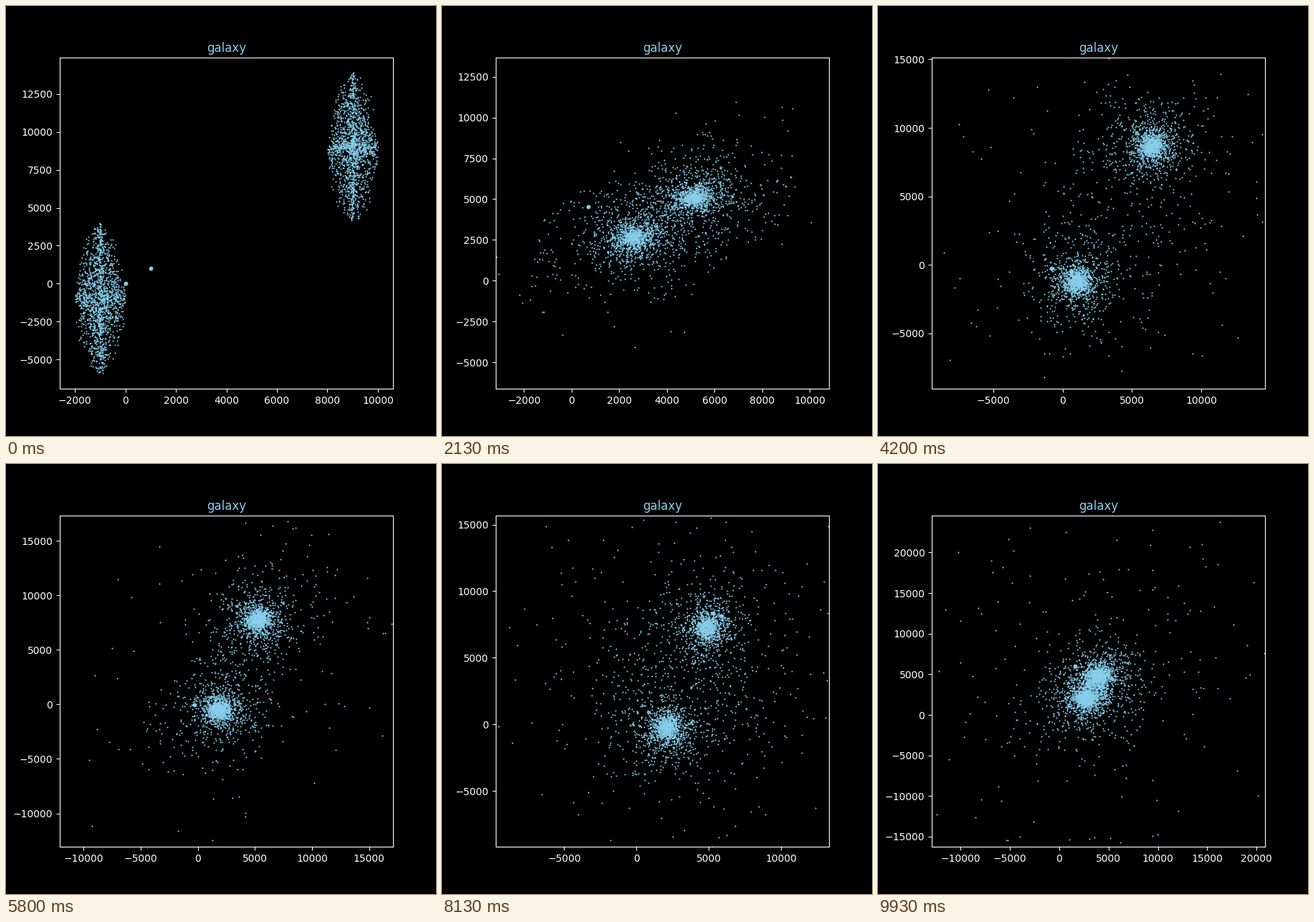
A matplotlib script that plays this animation: 600 px wide and 600 px high, repeating every 9.99 s.

```python
import numpy as np
import matplotlib.pyplot as plt
from matplotlib.animation import FuncAnimation

FRAMES = 150
STARS = 1500            # per galaxy
PULL = 1.4e9            # gravity of one core
SOFT = 800              # softening radius of a core
STEPS = 6               # integration steps per frame
KICK = 150              # random starting speed
SKY = "skyblue"
rng = np.random.default_rng(11)

# Key points: time, first core from the midpoint (x, y),
# view (left, right, bottom, top)
KEYS = np.array([
    [0, -5000, -5000, -2596, 10596, -6939, 14912],
    [18, -4000, -4150, -3640, 11925, -8075, 17068],
    [45, 1600, 2300, -2700, 9585, -5060, 10015],
    [63, 2700, 4950, -9447, 14600, -9027, 15130],
    [87, 1700, 4150, -12104, 17104, -13055, 17300],
    [122, -1400, -3750, -9727, 13292, -9196, 15673],
    [149, -650, -1500, -12945, 20872, -16236, 24546]], float)
times, swing, view = KEYS[:, 0], KEYS[:, 1:3], KEYS[:, 3:]
speed = np.gradient(swing, times, axis=0)
speed[0] = 0            # both fall from rest


def cores(t):
    """Both cores, swinging symmetrically about a slowly drifting midpoint."""
    i = min(np.searchsorted(times, t, side="right") - 1, len(times) - 2)
    span = times[i + 1] - times[i]
    s = (t - times[i]) / span
    ease = s * s * (3 - 2 * s)
    offset = swing[i] + (swing[i + 1] - swing[i]) * ease
    offset = offset + span * s * (1 - s) * (speed[i] * (1 - s) - speed[i + 1] * s)
    mid = 4000 - np.array([650, 600]) * t / FRAMES
    return mid + offset, mid - offset


def galaxy(center):
    """Tall ellipse of stars, denser along its axes."""
    turn = rng.uniform(0, 2 * np.pi, STARS)
    unit = np.column_stack([np.cos(turn), np.sin(turn)])
    return center + unit * rng.random((STARS, 2)) * [1000, 5000]


def gravity(spots, t):
    total = np.zeros_like(spots)
    for core in cores(t):
        away = core - spots
        dist2 = (away ** 2).sum(axis=1, keepdims=True) + SOFT ** 2
        total += PULL * away / dist2 ** 1.5
    return total


def simulate():
    """Leapfrog paths of all stars, then the two large bodies."""
    bodies = [[0, 0], [1000, 1000]]
    spots = np.vstack([galaxy(core) for core in cores(0)] + [bodies])
    pace = rng.normal(0, KICK, spots.shape)
    dt = 1 / STEPS
    history = [spots]
    for k in range((FRAMES - 1) * STEPS):
        half = spots + pace * dt / 2
        pace = pace + gravity(half, (k + 0.5) * dt) * dt
        spots = half + pace * dt / 2
        if (k + 1) % STEPS == 0:
            history.append(spots)
    return history


history = simulate()

fig = plt.figure(figsize=(6, 6), dpi=100, facecolor="black")
ax = fig.add_subplot(facecolor="black")
ax.set_title("galaxy", color=SKY, fontsize=12)
ax.tick_params(colors="white")
for spine in ax.spines.values():
    spine.set_edgecolor("white")
stars = ax.scatter([], [], s=2.2, c=SKY, linewidths=0)
bodies = ax.scatter([], [], s=18, c=SKY, linewidths=0)


def update(n):
    stars.set_offsets(history[n][:-2])
    bodies.set_offsets(history[n][-2:])
    left, right, bottom, top = [np.interp(n, times, side) for side in view.T]
    ax.set_xlim(left, right)
    ax.set_ylim(bottom, top)
    return stars, bodies


anim = FuncAnimation(fig, update, frames=FRAMES, interval=66.6,
                     repeat=True, repeat_delay=0, blit=False)
plt.show()
```
